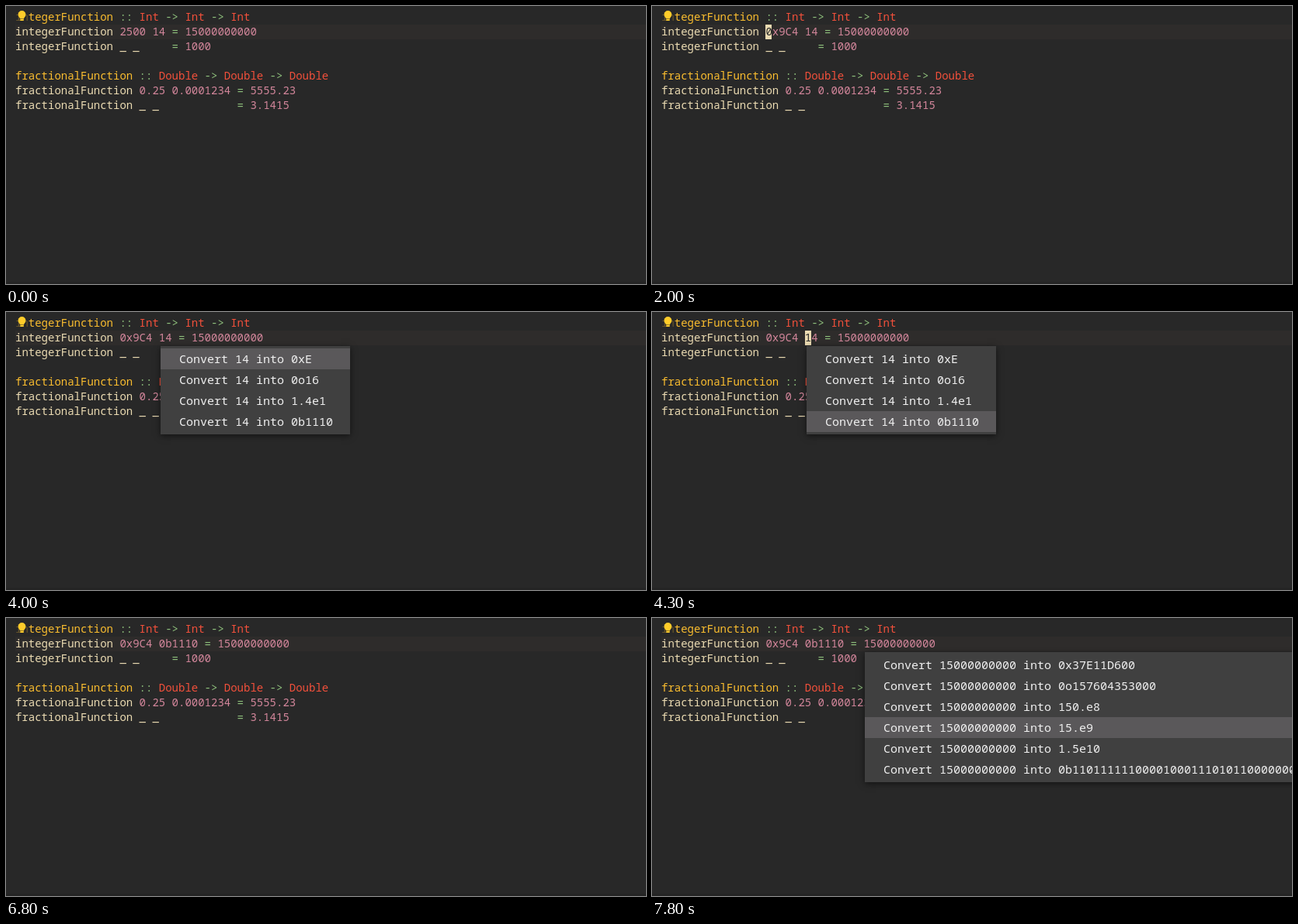
An HTML page with a canvas for the animation above (8 s loop, 824x359 px).

```html
<!DOCTYPE html>
<html lang="en">
<head>
<meta charset="utf-8">
<title>Number literal conversion</title>
<style>
  html, body { margin: 0; width: 100%; height: 100%; overflow: hidden; background: #282828; }
  canvas { display: block; }
</style>
</head>
<body>
<canvas id="stage" width="824" height="359"></canvas>
<script>
const ctx = document.getElementById('stage').getContext('2d');
const W = 824, H = 359, LOOP = 8000;
const CHAR = 8.4, LEFT = 12, LINE = 19, TOP = 5;
const MENU_TOP = 44, ROW = 27, PAD = 3;
const FONT = '"Noto Sans Mono", "DejaVu Sans Mono", monospace';
const COLORS = {
  bg: '#282828', line: '#2e2c2b', fg: '#ebdbb2', name: '#fabd2f',
  op: '#8ec07c', type: '#f2503b', num: '#d3869b',
  menu: '#404040', selected: '#5a585a', menuText: '#f0f0f0'
};

// [time, column]; a negative column hides the cursor
const CURSOR = [
  [0, -1], [500, 18], [1000, -1], [1500, 18], [2000, 16], [2300, 17],
  [2500, 18], [2700, 19], [2800, 20], [3000, 21], [3100, 22], [3600, -1],
  [4100, 22], [4600, -1], [5000, 25], [5500, -1], [5600, 26], [5800, 27],
  [5900, 28], [6100, 29], [6200, 30], [6300, 31], [6800, -1], [7300, 31],
  [7800, -1]
];

const ARGS = [[0, '2500 14'], [2000, '0x9C4 14'], [5000, '0x9C4 0b1110']];

const MENUS = [
  { from: 700, to: 2000, col: 18, value: '2500', picks: [1300],
    forms: ['0x9C4', '0o4704', '250.e1', '25.e2', '2.5e3', '0b100111000100'] },
  { from: 3600, to: 5000, col: 22, value: '14', picks: [4000, 4100, 4200, 4300],
    forms: ['0xE', '0o16', '1.4e1', '0b1110'] },
  { from: 6900, to: 8000, col: 31, value: '15000000000', picks: [7300, 7500, 7700, 7800],
    forms: ['0x37E11D600', '0o157604353000', '150.e8', '15.e9', '1.5e10',
            '0b1101111110000100011101011000000000'] }
];

const at = (track, t) => track.filter(([time]) => time <= t).pop()[1];
const colX = col => LEFT + col * CHAR;

function rect(x, y, w, h, color) {
  ctx.fillStyle = color;
  ctx.fillRect(x, y, w, h);
}

function text(str, x, y, color, size = 14) {
  ctx.font = `${size}px ${FONT}`;
  ctx.fillStyle = color;
  ctx.fillText(str, x, y);
}

function tokenColor(token, signature) {
  if (/^\d/.test(token)) return COLORS.num;
  if (/^[A-Z]/.test(token)) return COLORS.type;
  if (/^(::|->|=)$/.test(token)) return COLORS.op;
  return signature && token !== '_' ? COLORS.name : COLORS.fg;
}

function codeLine(source, row) {
  const signature = source.includes('::');
  for (const { 0: token, index } of source.matchAll(/\S+/g)) {
    text(token, colX(index), TOP + row * LINE + 14, tokenColor(token, signature));
  }
}

function bulb() {
  ctx.globalAlpha = 0.7;
  rect(LEFT, TOP, 2 * CHAR, LINE, COLORS.bg);
  ctx.globalAlpha = 1;
  ctx.fillStyle = '#ffcc2a';
  ctx.beginPath();
  ctx.arc(20.5, 11, 4.9, Math.PI * 0.75, Math.PI * 0.25);
  ctx.lineTo(22.7, 16.4);
  ctx.lineTo(18.3, 16.4);
  ctx.fill();
  rect(18.3, 17, 4.4, 2, '#ffcc2a');
}

function cursor(col, source) {
  if (col < 0) return;
  const x = Math.round(colX(col));
  rect(x, TOP + LINE, 8, LINE, COLORS.fg);
  text(source[col], colX(col), TOP + LINE + 14, COLORS.bg);
}

function menu({ col, value, forms, picks }, t) {
  const labels = forms.map(form => `Convert ${value} into ${form}`);
  const x = Math.round(colX(col) + 1.8);
  const w = Math.max(...labels.map(s => s.length)) * 9 + 46;
  const picked = picks.filter(time => time <= t).length - 1;
  ctx.save();
  ctx.shadowColor = 'rgba(0, 0, 0, 0.55)';
  ctx.shadowBlur = 8;
  ctx.shadowOffsetY = 2;
  rect(x, MENU_TOP, w, labels.length * ROW + 2 * PAD, COLORS.menu);
  ctx.restore();
  labels.forEach((label, i) => {
    const y = MENU_TOP + PAD + i * ROW;
    if (i === picked) rect(x, y, w, ROW, COLORS.selected);
    text(label, x + 24, y + 19, COLORS.menuText, 15);
  });
}

function draw(t) {
  const active = `integerFunction ${at(ARGS, t)} = 15000000000`;
  rect(0, 0, W, H, COLORS.bg);
  rect(LEFT, TOP + LINE, W - LEFT, LINE, COLORS.line);
  rect(0, 356, W, 3, '#242424');
  [
    'integerFunction :: Int -> Int -> Int',
    active,
    'integerFunction _ _     = 1000',
    '',
    'fractionalFunction :: Double -> Double -> Double',
    'fractionalFunction 0.25 0.0001234 = 5555.23',
    'fractionalFunction _ _            = 3.1415'
  ].forEach(codeLine);
  bulb();
  cursor(at(CURSOR, t), active);
  const open = MENUS.find(m => t >= m.from && t < m.to);
  if (open) menu(open, t);
}

const start = performance.now();
function tick() {
  draw((performance.now() - start) % LOOP);
  requestAnimationFrame(tick);
}
tick();
</script>
</body>
</html>
```
